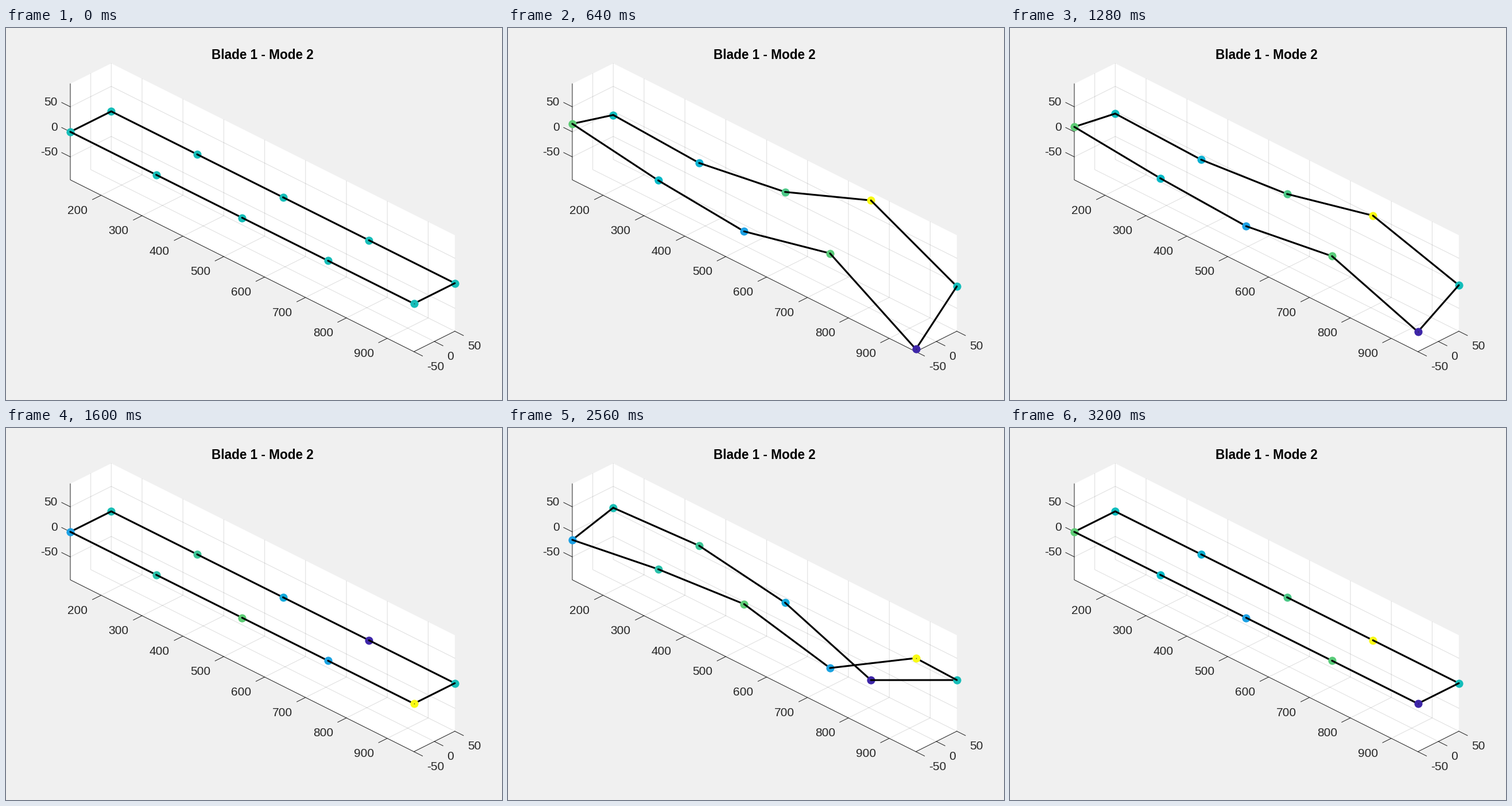
Animation, 864 px wide and 648 px high, one loop 3360 ms. Source, as a matplotlib script:

```python
import numpy as np
import matplotlib.pyplot as plt
from matplotlib.animation import FuncAnimation
from matplotlib.colors import LinearSegmentedColormap

W, H, DPI = 864, 648, 150
FRAMES, STEP_MS = 21, 160
INK = (0.15, 0.15, 0.15)

plt.rcParams["font.family"] = "Liberation Sans"

# Projected box: one corner and the three edge vectors, in pixels (y down)
ORIGIN = np.array([112.0, 264.5])
EX = np.array([598.5, 299.3])
EY = np.array([71.3, -35.6])
EZ = np.array([0.0, -167.3])


def proj(u, v, w=0.0):
    return ORIGIN + u * EX + v * EY + w * EZ


ramp = LinearSegmentedColormap.from_list("ramp", [
    (0, "#3e26a8"), (0.373, "#1ca1e4"), (0.468, "#01b9c7"),
    (0.532, "#28c1ab"), (0.627, "#5dcc75"), (1, "#f9fb15")])

fig = plt.figure(figsize=(W / DPI, H / DPI), dpi=DPI, facecolor=(0.94,) * 3)
ax = fig.add_axes([0, 0, 1, 1])
ax.set_xlim(0, W)
ax.set_ylim(H, 0)
ax.axis("off")


def path(points, color=INK, width=0.5, z=3, **kw):
    xs, ys = zip(*points)
    return ax.plot(xs, ys, color=color, lw=width, zorder=z, **kw)[0]


def grid(*points):
    path(points, color=INK + (0.15,), z=2)


def label(x, y, text, align, **kw):
    kw = {"size": 10, "color": INK, **kw}
    ax.text(x, y, text, ha=align, va="baseline", zorder=5, **kw)


# Walls and floor share one white outline
outline = [proj(0, 0), proj(0, 0, 1), proj(0, 1, 1),
           proj(1, 1, 1), proj(1, 1), proj(1, 0)]
ax.fill(*zip(*outline), color="white", lw=0, zorder=1)

for i in range(8):
    u = (53.7 + 71.2 * i) / EX[0]
    p = proj(u, 0)
    grid(p, proj(u, 1), proj(u, 1, 1))
    path([p, p + (-15, 7.5)])
    label(125 + 71.2 * i, 323.7 + 35.6 * i, str(200 + 100 * i), "center")

for i, name in enumerate(("-50", "0", "50")):
    v = i / 2
    if i:
        grid(proj(0, v, 1), proj(0, v), proj(1, v))
    p = proj(1, v)
    path([p, p + (15, 7.5)])
    label(733 + 35.5 * i, 596.3 - 18 * i, name, "left")

    w = 0.5 + (i - 1) * 43.6 / 167.3
    p = proj(0, 0, w)
    grid(p, proj(0, 1, w), proj(1, 1, w))
    path([p, p + (-15, -7.5)])
    label(90, 222 - 43.4 * i, name, "right")

path([proj(0, 0, 1), proj(0, 0), proj(1, 0), proj(1, 1)])
label(447, 54.3, "Blade 1 - Mode 2", "center",
      size=10.85, weight="bold", color="black")

# Mode shape: upward shift of each node in pixels, around the closed outline
shape = np.array([14.7, -10.2, -25.0, 13.4, -83.4,
                  -5.8, 73.0, 9.8, -15.8, -6.6])
N = len(shape)
level = (shape - shape.min()) / np.ptp(shape)
nodes = [(i / 4, 0) for i in range(5)] + [(i / 4, 1) for i in range(4, -1, -1)]
rest = np.array([proj(u, v, 0.5) for u, v in nodes])
# Nearness to the viewer sets the drawing order
near = [10 + 8.4 * u - v for u, v in nodes]

edges, dots = [], []
for i in range(N):
    j = (i + 1) % N
    edges.append(path([rest[i], rest[j]], "black", 1.5,
                      (near[i] + near[j]) / 2, solid_capstyle="round"))
    dots.append(path([rest[i]], z=near[i], marker="o", ms=6.8, mew=0))
tip = path([rest[4]], z=near[4] + 0.1, marker="o", ms=0.7, mew=0)


def update(k):
    pos = rest.copy()
    pos[:, 1] -= shape * np.sin(2 * np.pi * k / (FRAMES - 1))
    if k == 0:
        tone = np.full(N, 0.5)
    else:
        tone = 1 - level if 10 <= k < 20 else level
    for i in range(N):
        a, b = pos[i], pos[(i + 1) % N]
        edges[i].set_data([a[0], b[0]], [a[1], b[1]])
        dots[i].set_data([a[0]], [a[1]])
        dots[i].set_color(ramp(tone[i]))
    tip.set_data([pos[4, 0]], [pos[4, 1]])
    return edges + dots + [tip]


anim = FuncAnimation(fig, update, frames=FRAMES, interval=STEP_MS,
                     repeat=True, repeat_delay=0, blit=False)
plt.show()
```
